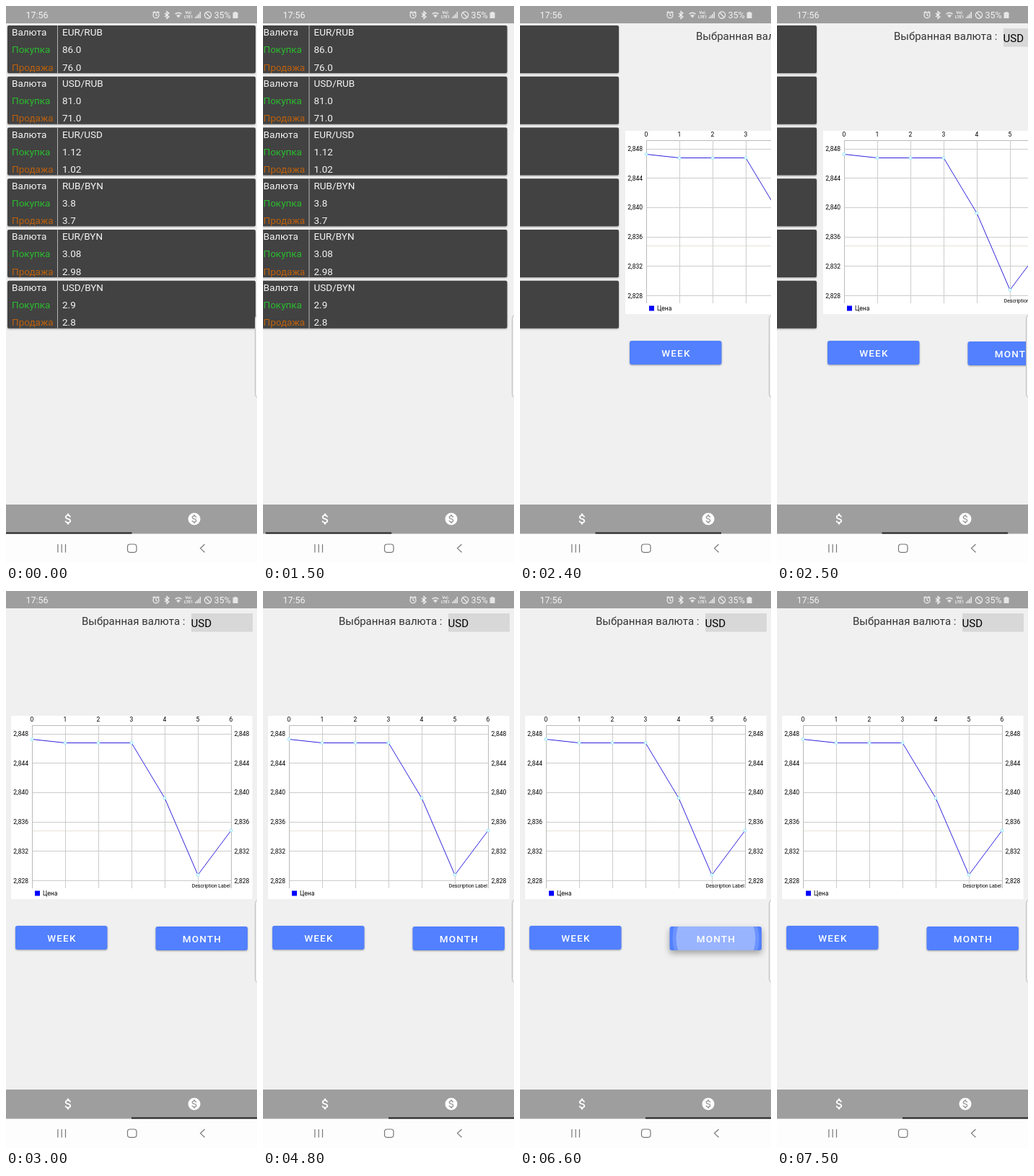
An HTML page that plays this animation: 348 px wide and 772 px high, repeating every 8000 ms.

```html
<!DOCTYPE html>
<html lang="ru">
<head>
<meta charset="utf-8">
<title>Курсы валют</title>
<style>
  html, body { margin: 0; width: 100%; height: 100%; overflow: hidden; background: #f0f0f0; }
  svg { display: block; width: 348px; height: 772px; font-family: Roboto, sans-serif; }
  .card, .button { filter: drop-shadow(0 1px 1px #0005); }
  .button.raised { filter: drop-shadow(0 4px 4px #0005); }
  .button text { font-size: 13.5px; font-weight: 500; letter-spacing: 1.2px; fill: #fff; text-anchor: middle; }
  .label { font-size: 8.5px; }
</style>
</head>
<body>
<svg viewBox="0 0 348 772">
  <defs>
    <path id="dollar" d="M11.8 10.9c-2.27-.59-3-1.2-3-2.15 0-1.09 1.01-1.85 2.7-1.85 1.78 0 2.44.85 2.5 2.1h2.21c-.07-1.72-1.12-3.3-3.21-3.81V3h-3v2.16c-1.94.42-3.5 1.68-3.5 3.61 0 2.31 1.91 3.46 4.7 4.13 2.5.6 3 1.48 3 2.41 0 .69-.49 1.79-2.7 1.79-2.06 0-2.87-.92-2.98-2.1h-2.2c.12 2.19 1.76 3.42 3.68 3.83V21h3v-2.15c1.95-.37 3.5-1.5 3.5-3.55 0-2.84-2.43-3.81-4.7-4.4z"/>
  </defs>
  <rect width="348" height="772" fill="#f0f0f0"/>

  <g id="pages">
    <g id="rates" font-size="13.5"></g>
    <g transform="translate(348)">
      <text x="105" y="47" font-size="15" fill="#333">Выбранная валюта :</text>
      <rect x="257" y="31" width="85" height="25.5" fill="#d8d8d8"/>
      <text x="256.5" y="49.5" font-size="15">USD</text>
      <g id="chart"></g>
      <g id="buttons"></g>
    </g>
  </g>

  <path d="M349 428.5h-1q-2.5 1-2.5 5v104q0 4 2.5 5h1z" fill="#f4f4f4" stroke="#b8b8b8"/>

  <!-- status bar -->
  <rect width="348" height="24" fill="#9e9e9e"/>
  <g fill="#f2f2f2" font-size="12.5">
    <text x="27.5" y="17.3">17:56</text>
    <text x="288.5" y="17.3">35%</text>
    <path d="M314.5 9h2V8h3v1h2v8h-7z" opacity=".85"/>
    <g font-size="5.5" font-weight="700"><text x="248.5" y="11.3">Vo)</text><text x="247" y="17.3">LTE1</text></g>
    <path d="M262 17v-2h1.3v2zm2.2 0v-4h1.3v4zm2.2 0v-6h1.3v6zm2.2 0V8h1.3v9z"/>
    <path d="M234 10.5q5-4 10 0l-1 1.2q-4-3-8 0zM236 13q3-2.2 6 0l-3 3.5z" opacity=".8"/>
  </g>
  <g fill="none" stroke="#f2f2f2" stroke-width="1.2">
    <circle cx="208" cy="12.7" r="4"/>
    <path d="M208 10v3l2 1M203.5 9.5l2.5-2M212.5 9.5l-2.5-2M220 10l6 5-3 2.5v-10l3 2.5-6 5"/>
    <circle cx="280" cy="12.5" r="4.6"/>
    <path d="M276.8 9.2l6.4 6.6"/>
  </g>

  <!-- tabs and navigation -->
  <rect y="691" width="348" height="41" fill="#9e9e9e"/>
  <use href="#dollar" fill="#fff" transform="translate(86 711) scale(.83) translate(-11.5 -12)"/>
  <circle cx="261" cy="711" r="8.5" fill="#fff"/>
  <use href="#dollar" fill="#9e9e9e" transform="translate(261 711) scale(.68) translate(-11.5 -12)"/>
  <rect y="731.5" width="348" height="41" fill="#fdfdfd"/>
  <rect id="indicator" y="729.5" width="174.5" height="2" fill="#222"/>
  <g fill="none" stroke="#777" stroke-width="1.2">
    <path d="M71.9 746v11.5M77.2 746v11.5M82.5 746v11.5M275.5 746l-6 5.6 6 5.6"/>
    <rect x="168.5" y="746" width="12.5" height="11.3" rx="3.5"/>
  </g>
</svg>
<script>
const get = id => document.getElementById(id);
const text = (x, y, str, attrs = '') => `<text x="${x}" y="${y}" ${attrs}>${str}</text>`;
const line = (d, color) => `<path d="${d}" fill="none" stroke="${color}"/>`;

// Rate cards
const rates = [
  ['EUR/RUB', '86.0', '76.0'], ['USD/RUB', '81.0', '71.0'], ['EUR/USD', '1.12', '1.02'],
  ['RUB/BYN', '3.8', '3.7'], ['EUR/BYN', '3.08', '2.98'], ['USD/BYN', '2.9', '2.8']
];
const rows = [['Валюта', '#f4f4f4'], ['Покупка', '#2abb2e'], ['Продажа', '#bd600c']];
get('rates').innerHTML = rates.map((values, i) =>
  `<g transform="translate(0 ${27 + i * 70.75})">
    <rect class="card" x="2" width="344" height="66" rx="2" fill="#424242"/>
    ${line('M71.5 0v66', '#b4b4b4')}` +
    rows.map(([name, color], r) => {
      const y = 14.3 + r * 24.1;
      return text(8, y, name, `fill="${color}"`) + text(78, y, values[r], 'fill="#f4f4f4"');
    }).join('') + '</g>').join('');

// Chart
const col = i => 36 + i * 46;
const points = [205.5, 210.5, 210.5, 210.5, 287, 393.5, 332].map((y, i) => [col(i), y]);
let chart = '<rect x="7" y="173" width="334.5" height="254" fill="#fff"/>' +
  line('M36 186.5h276', '#bbb') + line('M36 332.5h276', '#e8e2d8');
for (let i = 0; i < 6; i++) {
  const y = 198 + i * 40.7, value = '2,' + (848 - i * 4);
  chart += line(`M36 ${Math.floor(y) + .5}h276`, '#ccc') +
    text(31, y + 3, value, 'class="label" text-anchor="end"') +
    text(316.5, y + 3, value, 'class="label"');
}
for (let i = 0; i < 7; i++) {
  chart += line(`M${col(i) + .5} 186v226`, i % 6 ? '#ccc' : '#bbb') +
    text(col(i), 181, i, 'class="label" text-anchor="middle"');
}
chart += line('M' + points.join('L'), '#3022dc') +
  points.map(([x, y]) => `<circle cx="${x}" cy="${y}" r="1.9" fill="#fff" stroke="#8ce4fb"/>`).join('') +
  '<rect x="40" y="415.5" width="7" height="7" fill="#00f"/>' +
  text(51, 422.3, 'Цена', 'class="label"') +
  text(311, 411, 'Description Label', 'font-size="6.9" text-anchor="end"');
get('chart').innerHTML = chart;

// Buttons with a clipped ripple
const button = (id, x, y, name) =>
  `<g class="button" id="${id}" transform="translate(${x} ${y})">
    <clipPath id="${id}Clip"><rect width="127.5" height="33" rx="3"/></clipPath>
    <rect width="127.5" height="33" rx="3" fill="#5280ff"/>
    <g clip-path="url(#${id}Clip)"><g class="ripple" fill="#fff">
      <circle cx="64" cy="16.5" fill-opacity=".15"/><circle cx="64" cy="16.5" fill-opacity=".3"/>
    </g></g>
    ${text(64.4, 21.6, name)}
  </g>`;
get('buttons').innerHTML = button('week', 13, 464, 'WEEK') + button('month', 207.5, 465, 'MONTH');

function ripple(id, radius, alpha) {
  const el = get(id), wave = el.querySelector('.ripple');
  el.classList.toggle('raised', alpha > 0);
  wave.setAttribute('opacity', alpha);
  wave.children[0].setAttribute('r', radius + 5);
  wave.children[1].setAttribute('r', radius);
}

// Stepped tracks: [time, ...values]
const swipe = [[0, 0], [1300, 2.5], [1400, 6], [1500, 7.5], [2300, 90], [2400, 209],
  [2500, 291], [2600, 330], [2700, 344], [2800, 348]];
const weekPress = [[0, 0, 0], [5800, 55, 1], [5900, 75, .5], [6000, 0, 0]];
const monthPress = [[0, 0, 0], [6600, 55, 1], [6700, 75, .8], [6800, 75, .35], [6900, 0, 0]];
const at = (track, t) => track.findLast(step => step[0] <= t).slice(1);

function draw(now) {
  const t = now % 8000;
  const [shift] = at(swipe, t);
  get('pages').setAttribute('transform', `translate(${-shift})`);
  get('indicator').setAttribute('x', shift / 2);
  ripple('week', ...at(weekPress, t));
  ripple('month', ...at(monthPress, t));
  requestAnimationFrame(draw);
}
draw(0);
</script>
</body>
</html>
```
